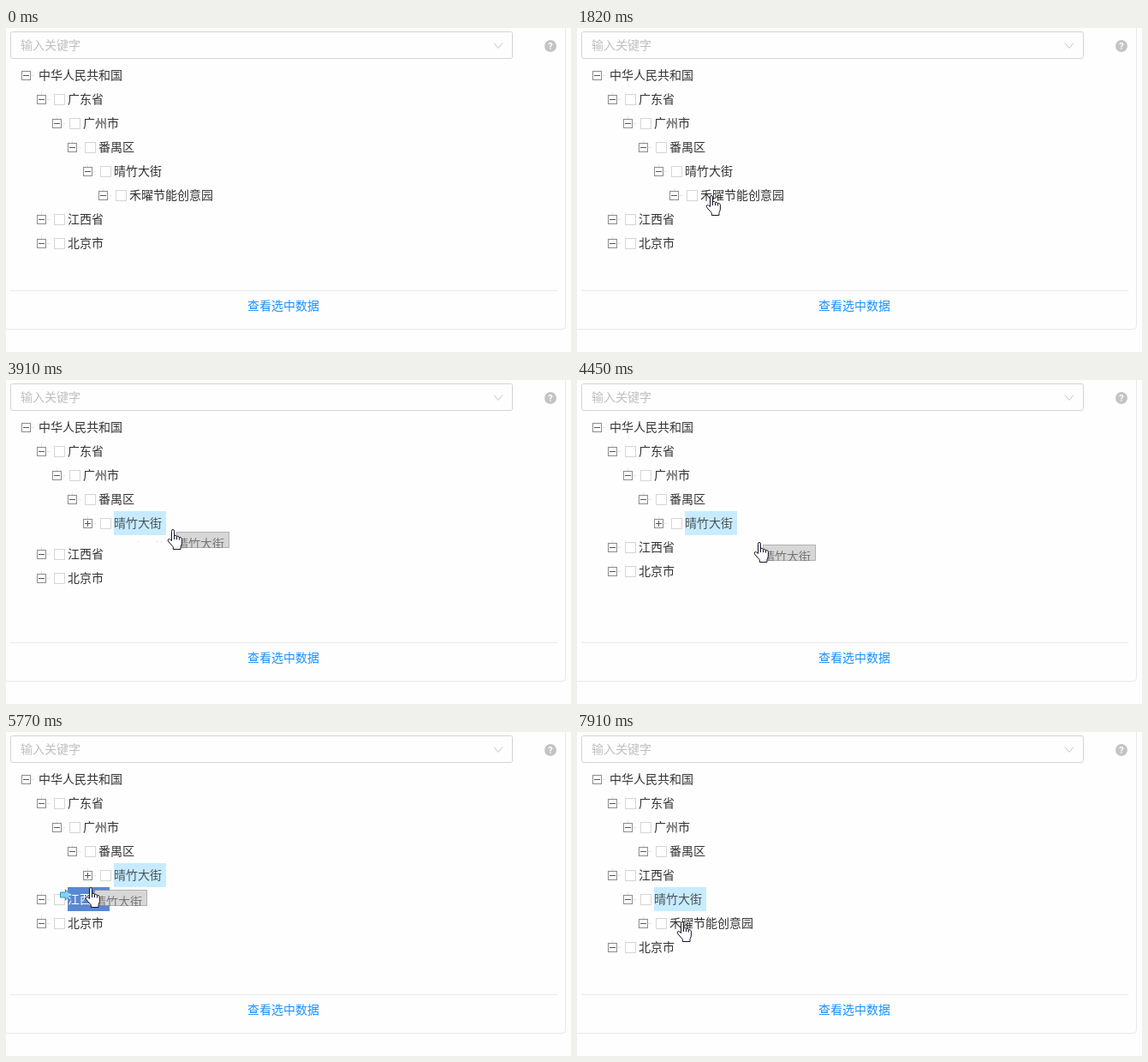
Write an HTML page that moves like this. It is 660 px wide and 378 px high and loops after 8 s.

```html
<!DOCTYPE html>
<html lang="zh-CN">
<head>
<meta charset="utf-8">
<title>树形选择</title>
<style>
  html, body { margin: 0; width: 100%; height: 100%; overflow: hidden; background: #fefefe; }
  svg { display: block; }
  text { font: 14px "Noto Sans CJK SC", "Noto Sans CJK", "Noto Sans CJK JP", sans-serif; fill: #333; white-space: pre; }
  .border { fill: none; stroke: #d4d4d4; }
  .rule { fill: none; stroke: #e8e8e8; }
  .dots { fill: none; stroke: #d2d2d2; stroke-dasharray: 1 1; }
  .toggle { fill: #fff; stroke: #8c8c8c; }
  .sign { stroke: #555; }
  .check { fill: #fff; stroke: #d6d6d6; }
  .cursor { fill: #fff; stroke: #15152a; stroke-linejoin: round; }
</style>
</head>
<body>
<svg width="660" height="378" viewBox="0 0 660 378">
  <rect width="660" height="378" fill="#fefefe"/>
  <path class="rule" d="M653.5 0V347.5Q653.5 351.5 649.5 351.5H0M5 306.5H644"/>
  <rect class="border" x="5.5" y="4.5" width="586" height="31" rx="2"/>
  <text x="17" y="25" style="fill:#bfbfbf">输入关键字</text>
  <path d="M570 17.5l5 6 5-6" fill="none" stroke="#c4c4c4"/>
  <circle cx="636" cy="21" r="7" fill="#c4c4c4"/>
  <text x="636" y="25" text-anchor="middle" style="font:bold 11px Roboto,sans-serif;fill:#fff">?</text>
  <text x="282" y="329" style="fill:#1890ff">查看选中数据</text>
  <g id="tree"></g>
  <g id="overlay"></g>
</svg>
<script>
const LOOP = 8000, ROW = 28, INDENT = 18;
const STREET = '晴竹大街', PARK = '禾曜节能创意园';
const TARGET = '江西省';

// time, cursor shape (a = arrow, h = hand), left, top
const moves = [
  [400, 'a', 456, 190], [520, 'a', 243, 169], [670, 'a', 200, 179], [790, 'h', 166, 200],
  [910, 'h', 146, 206], [1030, 'h', 149, 201], [1180, 'h', 153, 199], [1300, 'h', 156, 197],
  [1550, 'h', 154, 196], [1670, 'h', 152, 195], [1820, 'h', 150, 195], [2100, 'h', 149, 195],
  [2940, 'h', 147, 189], [3060, 'h', 144, 181], [3180, 'a', 142, 177],
  [3330, 'h', 136, 168], [3450, 'h', 133, 163], [3760, 'h', 182, 161],
  [3910, 'h', 188, 174], [4030, 'h', 194, 190], [4150, 'h', 196, 200], [4300, 'h', 201, 198],
  [4450, 'h', 206, 189], [4600, 'h', 190, 195], [4720, 'h', 174, 197],
  [4870, 'h', 150, 193], [4990, 'h', 127, 188], [5110, 'h', 109, 186],
  [5260, 'h', 107, 186], [5380, 'h', 105, 186], [5530, 'h', 99, 190], [5650, 'h', 95, 184],
  [5770, 'h', 92, 181], [6140, 'h', 126, 190], [6260, 'a', 216, 197], [6410, 'a', 245, 193],
  [7370, 'a', 186, 208], [7490, 'h', 131, 225], [7640, 'h', 117, 223],
  [7790, 'h', 114, 222], [7910, 'h', 116, 221]
];

const DRAG = 3760, OVER = 5110, DROP = 6140, TIP_ON = 2660, TIP_OFF = 2940;
const between = (t, a, b) => t >= a && t < b;
const label = (x, y, s, fill = '#333') => `<text x="${x}" y="${y}" style="fill:${fill}">${s}</text>`;
const rect = (x, y, w, h, attrs) => `<rect x="${x}" y="${y}" width="${w}" height="${h}" ${attrs}/>`;

function rowsAt(t) {
  const head = [[0, '中华人民共和国'], [1, '广东省'], [2, '广州市'], [3, '番禺区']];
  if (t >= DROP) return [...head, [1, TARGET], [2, STREET], [3, PARK], [1, '北京市']];
  const parkHeight = t < DRAG ? ROW : t < 3910 ? 20 : t < 4030 ? 8 : 0;
  return [...head, [4, STREET], [5, PARK, parkHeight], [1, TARGET], [1, '北京市']];
}

function drawRow(t, level, name, y) {
  const cx = 23.5 + INDENT * level, cy = y + .5;
  const textX = level ? 54 + INDENT * level : 38;
  const selected = name === STREET && t >= DRAG;
  const closed = selected && t < DROP;
  const over = name === TARGET && between(t, OVER, DROP);
  let out = `<path class="dots" d="M${cx + 6.5} ${cy}h3${level ? `M${cx} ${cy - 8.5}v3` : ''}"/>`
    + rect(cx - 5, cy - 5, 10, 10, 'class="toggle"')
    + `<path class="sign" d="M${cx - 3.5} ${cy}h7${closed ? `M${cx} ${cy - 3.5}v7` : ''}"/>`;
  if (level) out += rect(cx + 15, cy - 6, 12, 12, 'class="check"');
  if (selected) out += rect(textX, y - 14, 61, ROW, 'fill="#c8ecff"');
  if (over) {
    out += rect(textX, y - 14, 49, ROW, 'fill="#5a88d1"')
      + `<path d="M63.5 ${y - 8}h6v-3l6.5 6-6.5 6v-3h-6z" fill="#85d3f5" stroke="#378fc4"/>`;
  }
  const color = over ? (t < 5260 ? '#70737a' : t < 5380 ? '#bbc3d0' : '#fff') : selected ? '#4b535a' : '#333';
  return out + label(textX, y + 5, name, color);
}

function drawTree(t) {
  let top = 41, out = '';
  for (const [level, name, height = ROW] of rowsAt(t)) {
    const row = height ? drawRow(t, level, name, top + 14) : '';
    out += height && height < ROW
      ? `<svg y="${top}" width="660" height="${height}" viewBox="0 ${top} 660 ${height}" opacity="${height / ROW}">${row}</svg>`
      : row;
    top += height;
  }
  return out;
}

const cursors = {
  a: '<path d="M.5.5V16.5L4.2 13 6.8 18.5 9.2 17.5 6.7 12H11.5Z"/>',
  h: '<path d="M5.5 13.5V2.2Q5.5.5 7 .5T8.5 2.2V8Q8.8 7.3 9.9 7.3T11.5 8.7Q11.8 8.1 12.9 8.3T14.4 9.9Q14.9 9.3 16 9.7T17.4 11.2V16Q17.4 18 16 20.4V23.5H7.3V20.8L2.2 15Q.7 13 1.4 12T3.8 12Z"/>'
    + '<path d="M8.5 8v4M11.5 8.7v3.5M14.4 9.9v2.7" fill="none"/>'
};

function drawGhost(x, y) {
  return `<svg x="${x}" y="${y}" width="62" height="19">`
    + rect(.5, .5, 61, 18, 'fill="#d7d7d7" stroke="#777" stroke-dasharray="1 1"')
    + label(0, 19, STREET, '#777') + '</svg>';
}

function drawTip() {
  return rect(167, 212, 98, 23, 'fill="#000" opacity=".12"')
    + rect(165.5, 210.5, 97, 22, 'fill="#fff" stroke="#8a8a8a"')
    + `<text x="172" y="226" style="font-size:12px;fill:#575757">${PARK}</text>`;
}

function drawOverlay(t) {
  const move = moves.filter(m => m[0] <= t).pop();
  if (!move) return '';
  const [, shape, x, y] = move;
  return (between(t, TIP_ON, TIP_OFF) ? drawTip() : '')
    + (between(t, DRAG, DROP) ? drawGhost(x + 11, y + 3) : '')
    + `<g class="cursor" transform="translate(${x} ${y})">${cursors[shape]}</g>`;
}

const tree = document.getElementById('tree'), overlay = document.getElementById('overlay');
const stops = [0, TIP_ON, ...moves.map(m => m[0])].sort((a, b) => a - b);
const start = performance.now();
let shown = -1;

function tick() {
  const t = (performance.now() - start) % LOOP;
  const stop = stops.filter(s => s <= t).pop();
  if (stop !== shown) {
    shown = stop;
    tree.innerHTML = drawTree(stop);
    overlay.innerHTML = drawOverlay(stop);
  }
  requestAnimationFrame(tick);
}
tick();
</script>
</body>
</html>
```
